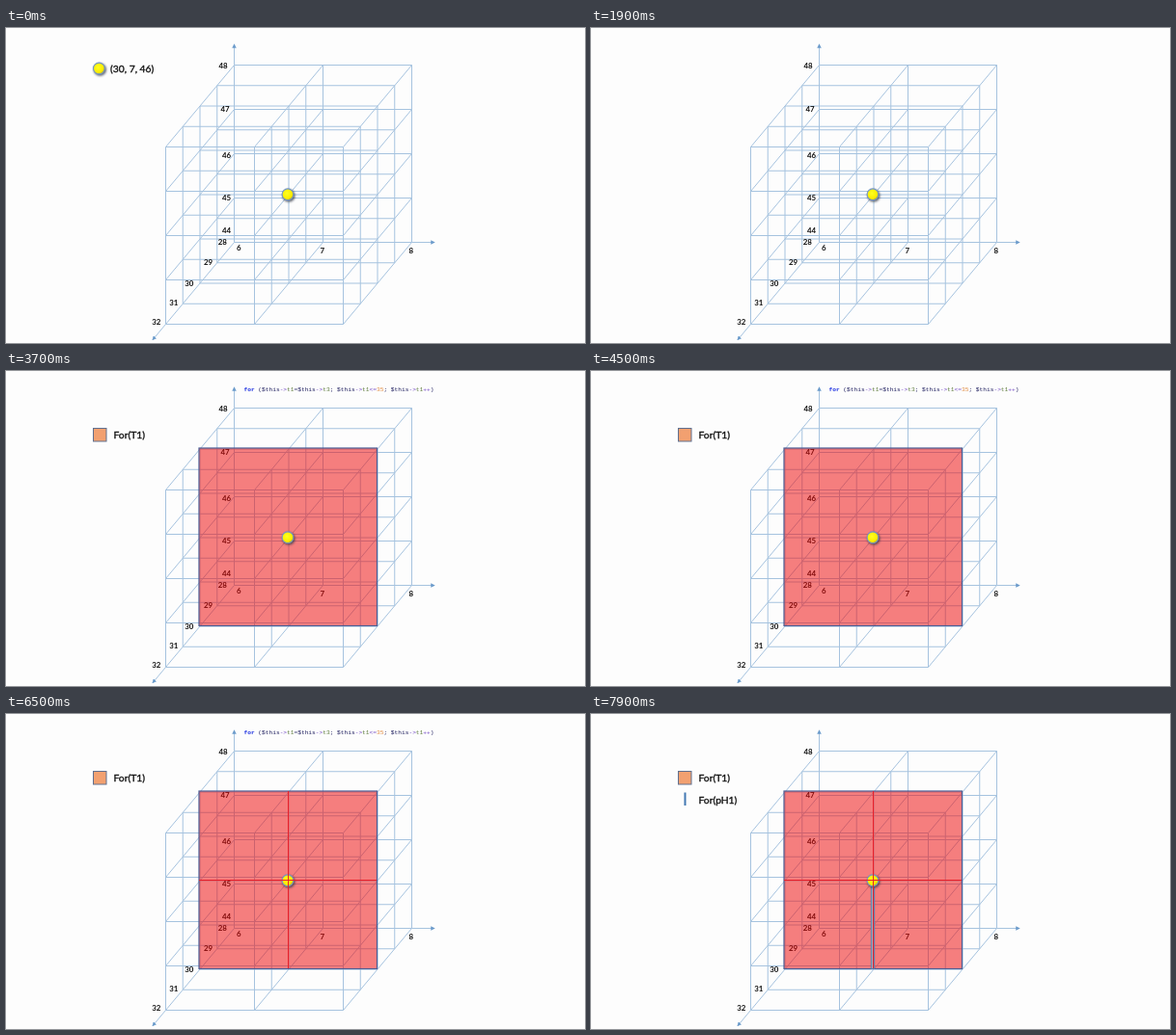
An HTML page that plays this animation: 600 px wide and 327 px high, repeating every 8 s.

```html
<!DOCTYPE html>
<html lang="en">
<head>
<meta charset="utf-8">
<title>Lattice search</title>
<style>
  html, body { margin: 0; width: 100%; height: 100%; overflow: hidden; background: #fdfdfd; }
  svg { display: block; width: 100vw; height: 100vh; }
  text { font-family: Lato, "Open Sans", sans-serif; fill: #111; white-space: pre; }
  #labels text { font-size: 7.9px; font-weight: bold; }
  .legend { font-size: 10.3px; stroke: #111; stroke-width: .35; }
  #code text { font: 6.2px "Liberation Mono", monospace; fill: #202060; }
  #code .key { fill: #1b2fe0; font-weight: bold; }
  #code .field { fill: #5c7a3a; }
  #code .number { fill: #e08a3c; }
  #code .mark { fill: #6a3fc0; }
</style>
</head>
<body>
<svg viewBox="0 0 600 327">
  <defs>
    <radialGradient id="yellow" cx=".42" cy=".4" r=".62">
      <stop offset="0" stop-color="#ffff20"/>
      <stop offset=".7" stop-color="#fbee00"/>
      <stop offset="1" stop-color="#cdb800"/>
    </radialGradient>
    <filter id="soft" x="-50%" y="-50%" width="200%" height="200%">
      <feGaussianBlur stdDeviation=".9"/>
    </filter>
    <g id="ball">
      <circle cx="1" cy="1.2" r="6.6" fill="#303848" opacity=".75" filter="url(#soft)"/>
      <circle r="5.9" fill="url(#yellow)" stroke="#7497c4" stroke-width="1.1"/>
    </g>
    <marker id="arrow" viewBox="0 0 6 6" refX="5" refY="3" markerWidth="4.5" markerHeight="4.5"
            markerUnits="userSpaceOnUse" orient="auto">
      <path d="M0 0L6 3L0 6z" fill="#6b9bcb"/>
    </marker>
  </defs>

  <path id="grid" fill="none" stroke="#a6c3df"/>
  <g stroke="#a6c3df">
    <path d="M236.5 38V17" marker-end="url(#arrow)"/>
    <path d="M420.5 222.5H444" marker-end="url(#arrow)"/>
    <path d="M165.5 307.5L152 323.7" marker-end="url(#arrow)"/>
  </g>
  <g id="labels"></g>

  <g id="pointLegend">
    <use href="#ball" x="96.4" y="42"/>
    <text class="legend" x="108" y="45.8">(30, 7, 46)</text>
  </g>

  <g id="plane">
    <rect x="200" y="80" width="184.5" height="184.5" fill="#ee0a0a" fill-opacity=".52"
          stroke="#4c5f96" stroke-width="1.2"/>
    <rect x="90.5" y="59.5" width="13.5" height="13.5" fill="#f2a070" stroke="#60708f"/>
    <text class="legend" x="111.5" y="69.5">For(T1)</text>
  </g>

  <g id="bar">
    <rect x="290.3" y="173" width="3.4" height="91.5" fill="#a7adbd" stroke="#4f78aa" stroke-width=".9"/>
    <path d="M97.5 81.5V95" stroke="#4379b3" stroke-width="2"/>
    <text class="legend" x="111.5" y="93">For(pH1)</text>
  </g>

  <use href="#ball" x="292" y="172.8"/>
  <path id="cross" d="M200 172.5H384M292.5 80V264" stroke="#e8202a"/>

  <g id="code"><text x="246.5" y="21"></text></g>
</svg>
<script>
const find = id => document.getElementById(id);

// Lattice: three columns, five levels, five depths
const project = (column, level, depth) =>
  [236.5 + 92 * column - 17.75 * depth, 222.5 - 46 * level + 21.25 * depth];
const segment = (a, b) => `M${project(...a)}L${project(...b)}`;
let lattice = "";
for (let i = 0; i < 5; i++) {
  for (let j = 0; j < 5; j++) lattice += segment([0, i, j], [2, i, j]);
  for (let column = 0; column < 3; column++) {
    lattice += segment([column, 0, i], [column, 4, i]);
    lattice += segment([column, i, 0], [column, i, 4]);
  }
}
find("grid").setAttribute("d", lattice);

const labels = [
  [48, 220.5, 42], [47, 222.5, 87.3], [46, 224, 135], [45, 224, 179], [44, 224, 213.3],
  [28, 219.7, 225.3], [29, 205, 245.5], [30, 185.3, 267.5], [31, 169.2, 288.3], [32, 151.3, 308.3],
  [6, 239, 230.7], [7, 325.5, 233.8], [8, 417.5, 233.8]
];
find("labels").innerHTML = labels
  .map(([value, x, y]) => `<text x="${x}" y="${y}">${value}</text>`).join("");

const span = (kind, text) => `<tspan class="${kind}">${text}</tspan>`;
const field = name => "$this" + span("mark", "-&gt;") + span("field", name);
document.querySelector("#code text").innerHTML =
  span("key", "for") + " (" + field("t1") + "=" + field("t3") + "; " +
  field("t1") + span("mark", "&lt;=") + span("number", "35") + "; " +
  field("t1") + span("mark", "++") + ")";

const LOOP = 8000, STEP = 100;
const ramp = (t, start, end) => Math.min(1, Math.max(0, (t - start) / (end - start)));
const opacity = {
  pointLegend: t => 1 - ramp(t, 400, 900),
  plane: t => ramp(t, 1900, 2300),
  code: t => ramp(t, 3200, 3600) - ramp(t, 6800, 7200),
  cross: t => ramp(t, 4500, 4900),
  bar: t => ramp(t, 7200, 7600)
};

function draw(now) {
  const t = Math.floor((now % LOOP) / STEP) * STEP;
  // The opening pose holds for half a second
  for (const id in opacity) find(id).setAttribute("opacity", opacity[id](t < 500 ? 0 : t));
  requestAnimationFrame(draw);
}
draw(performance.now());
</script>
</body>
</html>
```
